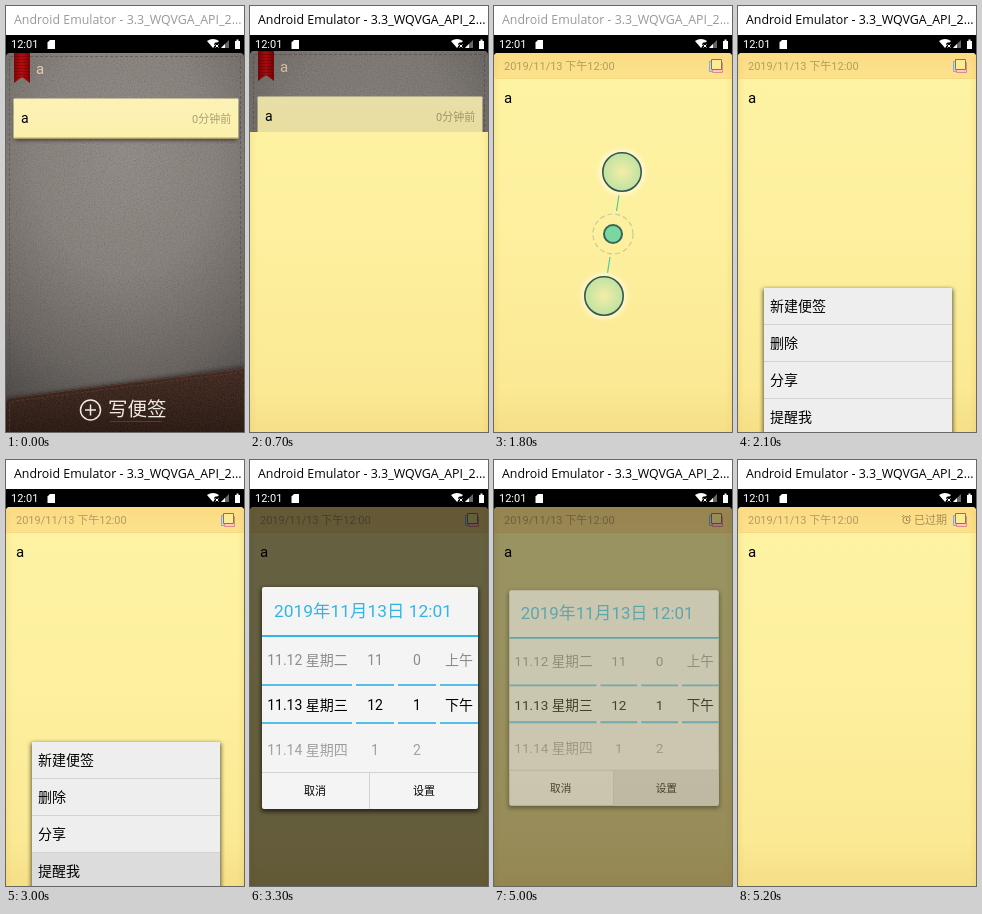
Write an HTML page that moves like this. It is 238 px wide and 426 px high and loops after 8000 ms.

```html
<!DOCTYPE html>
<html lang="zh-CN">
<head>
<meta charset="utf-8">
<title>Notes</title>
<style>
html, body { margin: 0; width: 100%; height: 100%; overflow: hidden; background: #fff; }
svg { display: block; width: 238px; height: 426px; }
text { font: 11px Roboto, "Noto Sans CJK SC", "Noto Sans CJK", sans-serif; white-space: pre; }
#title { font: 12.4px "Open Sans", "Noto Sans", sans-serif; }
.body { font-size: 15px; }
.item, .wheel { font-size: 14px; }
.mid { text-anchor: middle; }
.stitch { fill: none; stroke-dasharray: 3 2; }
</style>
</head>
<body>
<svg viewBox="0 0 238 426">
  <defs>
    <radialGradient id="felt" gradientUnits="userSpaceOnUse" cx="119" cy="150" r="290" gradientTransform="translate(25 0) scale(.79 1)">
      <stop offset="0" stop-color="#958e89"/><stop offset=".4" stop-color="#8b8580"/><stop offset=".75" stop-color="#6d6864"/><stop offset="1" stop-color="#4f4b48"/>
    </radialGradient>
    <linearGradient id="hide" x2="0" y2="1">
      <stop stop-color="#4b3229"/><stop offset=".45" stop-color="#3f2a21"/><stop offset="1" stop-color="#2b1b15"/>
    </linearGradient>
    <linearGradient id="red"><stop stop-color="#7d0607"/><stop offset=".5" stop-color="#b80d0f"/><stop offset="1" stop-color="#780506"/></linearGradient>
    <linearGradient id="paper" x2="0" y2="1">
      <stop stop-color="#fef3a3"/><stop offset=".4" stop-color="#fdf1a0"/><stop offset=".88" stop-color="#fbe994"/><stop offset="1" stop-color="#f5df87"/>
    </linearGradient>
    <linearGradient id="sides">
      <stop stop-color="#e0b850" stop-opacity=".2"/><stop offset=".03" stop-color="#e8c860" stop-opacity="0"/>
      <stop offset=".97" stop-color="#e8c860" stop-opacity="0"/><stop offset="1" stop-color="#e0b850" stop-opacity=".2"/>
    </linearGradient>
    <linearGradient id="head" x2="0" y2="1"><stop stop-color="#fbdb84"/><stop offset="1" stop-color="#fce28c"/></linearGradient>
    <linearGradient id="card" x2="0" y2="1"><stop stop-color="#fcf2b6"/><stop offset="1" stop-color="#fcf0ac"/></linearGradient>
    <radialGradient id="touch"><stop stop-color="#f4eea6"/><stop offset="1" stop-color="#bfe2a2"/></radialGradient>
    <linearGradient id="fade" x2="0" y2="1"><stop stop-color="#f4f4f4" stop-opacity="0"/><stop offset="1" stop-color="#f4f4f4" stop-opacity=".4"/></linearGradient>
    <filter id="grain" x="0" y="0" width="1" height="1">
      <feTurbulence type="fractalNoise" baseFrequency=".7" numOctaves="2" seed="4"/>
      <feColorMatrix values="0 0 0 0 0  0 0 0 0 0  0 0 0 0 0  1.2 0 0 0 -.45"/>
    </filter>
    <filter id="soft" x="-20%" y="-20%" width="140%" height="140%"><feGaussianBlur stdDeviation="2"/></filter>
    <clipPath id="reveal"><rect id="window" width="238" height="426"/></clipPath>
    <clipPath id="below"><path d="M0 47H238V426H0z"/></clipPath>
    <clipPath id="hideEdge"><path d="M0 426V400Q0 393 7 391L238 362V426z"/></clipPath>
  </defs>

  <path d="M0 29H238V426H0z"/>

  <g id="list">
    <path d="M0 440V51Q0 47 4 47H234Q238 47 238 51V440z" fill="url(#felt)"/>
    <path d="M0 48H238V426H0z" filter="url(#grain)" opacity=".2"/>
    <path class="stitch" d="M3.5 390V50.5H234.5V362" stroke="#4c4744" stroke-opacity=".5"/>
    <path d="M8 47H24V77L16 71L8 77z" fill="url(#red)"/>
    <path d="M16 47V72" stroke="#400" stroke-opacity=".3" stroke-width="15" stroke-dasharray="1 2"/>
    <text class="body" x="30" y="68" fill="#e6cba9">a</text>
    <path d="M9 97H231V134H9z" filter="url(#soft)" opacity=".6"/>
    <rect x="7.5" y="92.500" width="225" height="40" rx="1" fill="url(#card)"/>
    <path d="M8 132H232" stroke="#b9a260"/>
    <text class="item" x="15" y="117" font-weight="500">a</text>
    <text x="186" y="117" fill="#aaa075">0分钟前</text>
    <path d="M0 392L238 360V366L0 400z" filter="url(#soft)" opacity=".4"/>
    <g clip-path="url(#hideEdge)">
      <path d="M0 362H238V440H0z" fill="url(#hide)"/>
      <path d="M0 362H238V426H0z" filter="url(#grain)" opacity=".6"/>
      <path d="M0 392.500L238 362.500" stroke="#5b3f34"/>
      <path class="stitch" d="M3.500 426V401Q4 396 9 395L238 366" stroke="#5f4337" stroke-opacity=".6"/>
    </g>
    <g fill="none" stroke="#eee9e4">
      <circle cx="84.500" cy="404" r="10" stroke-width="1.500"/>
      <path d="M79 404H90M84.500 398.500V409.500" stroke-width="1.500"/>
      <path d="M104 415.500H156" stroke-opacity=".15"/>
    </g>
    <text x="102" y="410" fill="#eee9e4" style="font-size:19.500px;font-weight:100">写便签</text>
  </g>
  <path id="listDim" d="M0 29H238V426H0z"/>

  <g clip-path="url(#reveal)">
    <g id="page">
      <path d="M0 426V51Q0 47 4 47H234Q238 47 238 51V426z" fill="url(#paper)"/>
      <path d="M0 73V51Q0 47 4 47H234Q238 47 238 51V73z" fill="url(#head)"/>
      <path d="M0 51H238V426H0z" fill="url(#sides)"/>
      <path d="M0 72.500H238" stroke="#f5d880"/>
      <text x="10" y="64" fill="#b39d61">2019/11/13 下午12:00</text>
      <path d="M215.500 55.500H225.500V65.500H215.500z" fill="#c9d8f0" stroke="#8ea6d4"/>
      <path d="M218.500 56.500H228.500V66.500H218.500z" fill="#f7c9c0" stroke="#e08a86"/>
      <path d="M217.500 53.500H227.500V63.500H217.500z" fill="#fdeb94" stroke="#857a4c"/>
      <text class="body" x="10" y="97" font-weight="500">a</text>
      <g id="expired">
        <g fill="none" stroke="#8a7743" stroke-width=".8">
          <circle cx="168.500" cy="60" r="3.600"/>
          <path d="M168.500 57.500V60.500H170.500M164 57L166 55M171 55L173 57"/>
        </g>
        <text x="176" y="64" fill="#a58f58">已过期</text>
      </g>
    </g>
  </g>

  <g id="pinch">
    <path d="M125 189L122.500 205M116 251L113.500 267" stroke="#45d09a" stroke-width="1.200"/>
    <circle cx="119" cy="228" r="20" fill="none" stroke="#c6cd98" stroke-width="1.200" stroke-dasharray="5 3"/>
    <circle cx="119" cy="228" r="9" fill="#79d8a0" stroke="#35645a" stroke-width="2"/>
    <g id="fingers"></g>
  </g>

  <g id="menu" clip-path="url(#below)">
    <g id="panel">
      <path d="M25 283H215V440H25z" filter="url(#soft)" opacity=".6"/>
      <path d="M26 282H214V440H26z" fill="#eee"/>
      <path id="hit" d="M26 393H214V440H26z" fill="#dcdcdc"/>
      <path d="M26 318.500H214M26 355.500H214M26 392.500H214" stroke="#d3d3d3"/>
      <g id="items"></g>
    </g>
  </g>

  <path id="dim" d="M0 47H238V426H0z"/>

  <g id="dialog">
    <rect x="11" y="128" width="218" height="224" rx="3" filter="url(#soft)" opacity=".6"/>
    <rect x="12" y="127" width="216" height="222" rx="2" fill="#f4f4f4"/>
    <path id="press" d="M120 313H228V347Q228 349 226 349H120z" fill="#dedede"/>
    <text x="24" y="157" fill="#33b5e5" style="font-size:17.400px">2019年11月13日 12:01</text>
    <path d="M12 176H228" stroke="#33b5e5" stroke-width="2"/>
    <g id="wheels"></g>
    <path d="M12 268H228V312H12z" fill="url(#fade)"/>
    <path d="M12 312.500H228M119.500 313V349" stroke="#d2d2d2"/>
    <text class="mid" x="65" y="335">取消</text>
    <text class="mid" x="174" y="335">设置</text>
  </g>

  <g fill="#fff">
    <text x="5" y="42" font-weight="700">12:01</text>
    <path d="M44 34H49V43H41.500V36.500z"/>
    <path d="M201 35Q207 31 213 35L207 42z"/>
    <path d="M209 37L213 42M213 37L209 42" stroke="#000" stroke-width="3"/>
    <path d="M209.500 38.500L212.500 41.500M212.500 38.500L209.500 41.500" stroke="#fff"/>
    <path d="M215 42L223 34V42z" opacity=".4"/>
    <path d="M215 42L219 38V42z"/>
    <path d="M229 35H230.500V33.500H232.500V35H234V43H229z"/>
  </g>
  <path d="M0 0H238V29H0z" fill="#fff"/>
  <text id="title" x="8" y="18">Android Emulator - 3.3_WQVGA_API_2...</text>
</svg>

<script>
const $ = id => document.getElementById(id);
const set = (id, name, value) => $(id).setAttribute(name, value);
const show = (id, on) => set(id, 'display', on ? 'inline' : 'none');
const fade = (id, value) => { set(id, 'opacity', value); show(id, value > 0); };

$('items').innerHTML = ['新建便签', '删除', '分享', '提醒我']
  .map((s, i) => `<text class="item" x="32" y="${305 + 37 * i}">${s}</text>`).join('');

$('fingers').innerHTML = [[128, 166], [110, 290]].map(([x, y]) => `
  <circle cx="${x}" cy="${y}" r="21" fill="none" stroke="#fff" stroke-opacity=".75" stroke-width="3" filter="url(#soft)"/>
  <circle cx="${x}" cy="${y}" r="19.2" fill="url(#touch)" stroke="#35564f" stroke-width="1.6"/>`).join('');

// Each wheel: left, right, text centre, rows
$('wheels').innerHTML = [
  [12, 102, 57.5, '11.12 星期二', '11.13 星期三', '11.14 星期四'],
  [106, 144, 125, '11', '12', '1'],
  [148, 186, 167, '0', '1', '2'],
  [190, 228, 209, '上午', '下午', '']
].map(([l, r, x, ...rows]) =>
  `<path d="M${l} 225H${r}M${l} 263H${r}" stroke="#55bfe8" stroke-width="2"/>` +
  rows.map((s, i) => `<text class="wheel mid" x="${x}" y="${205 + 45 * i}" fill="${i == 1 ? '#000' : '#8c8c8c'}">${s}</text>`).join('')
).join('');

// Value at time t: `before`, then one entry per 100 ms from `start`, holding the last
const steps = (t, start, before, values) =>
  t < start ? before : values[Math.min(values.length - 1, Math.floor((t - start) / 100))];

function draw(t) {
  const open = (before, ...values) => steps(t, 600, before, values);
  set('title', 'fill', t < 400 || (t >= 1800 && t < 1900) ? '#999' : '#000');

  show('list', t < 1000);
  set('list', 'transform', `translate(0 ${open(0, 0, -2, -5, -6)})`);
  fade('listDim', open(0, .02, .08, .1, .1, 0));
  set('window', 'y', open(426, 400, 126, 74, 55, 29));
  set('page', 'transform', `translate(0 ${open(16, 15, 4, 2, 1, 0)})`);

  show('pinch', t >= 1800 && t < 1900);

  fade('menu', t < 3000 ? steps(t, 1900, 0, [.35, .8, 1]) : steps(t, 3000, 1, [1, .6, .1, 0]));
  set('panel', 'transform', `translate(0 ${t < 3000 ? steps(t, 1900, 40, [24, 6, 0]) : steps(t, 3000, 0, [0, 10, 30])})`);
  show('hit', t >= 3000);

  const closing = t >= 4900;
  fade('dim', closing ? steps(t, 4900, .6, [.6, .4, .12, 0]) : steps(t, 3000, 0, [0, .2, .5, .6]));
  fade('dialog', closing ? steps(t, 4900, 1, [1, .55, .1, 0]) : steps(t, 3000, 0, [0, .3, .9, 1]));
  const size = closing ? steps(t, 4900, 1, [1, .97, .92]) : steps(t, 3000, .9, [.9, .94, .99, 1]);
  set('dialog', 'transform', `translate(120 238) scale(${size}) translate(-120 -238)`);
  show('press', closing);
  show('expired', t >= 5200);
}

const begin = performance.now();
function tick() {
  draw((performance.now() - begin) % 8000);
  requestAnimationFrame(tick);
}
tick();
</script>
</body>
</html>
```
